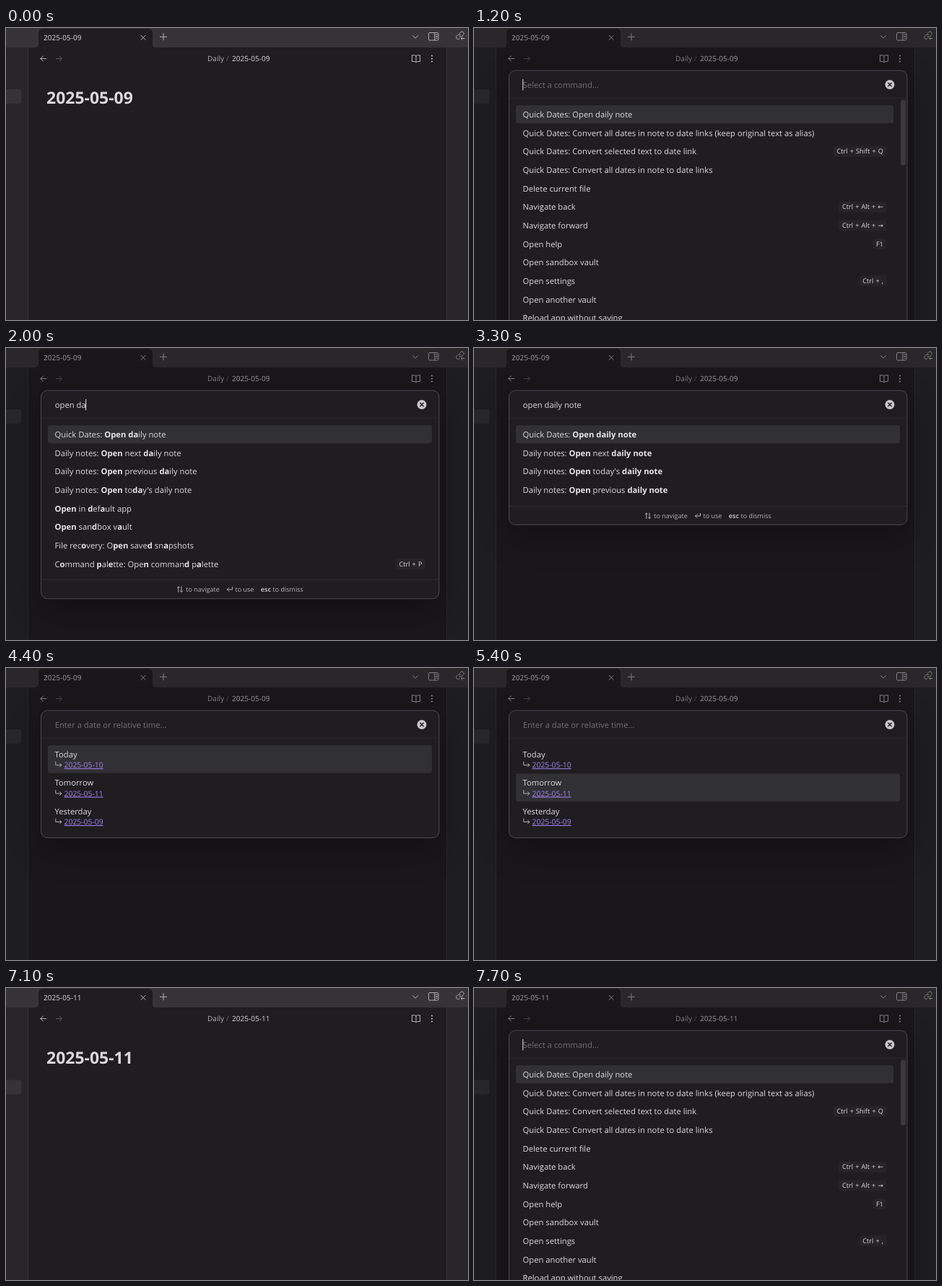
These frames come from a looping animation (640x405 px, 8 s). An HTML page:

```html
<!DOCTYPE html>
<html lang="en">
<head>
<meta charset="utf-8">
<title>Daily note palette</title>
<style>
html, body { margin: 0; width: 100%; height: 100%; overflow: hidden; background: #1f1d20; }
svg { display: block; width: 640px; height: 405px; }
text { font-family: "Open Sans", "Noto Sans", "DejaVu Sans", sans-serif; font-size: 11.25px; fill: #dadada; white-space: pre; text-rendering: geometricPrecision; }
.b { font-weight: 700; fill: #e6e6e6; }
.tab { font-size: 10.05px; }
.title { font-size: 23px; font-weight: 700; }
.hint { font-size: 9px; fill: #b0afb1; }
.key { font-size: 9.2px; word-spacing: .7px; text-anchor: end; }
.link { font-size: 10.4px; fill: #a283ee; text-decoration: underline; }
.ph { fill: #727074; }
.ico { fill: none; stroke: #b2b1b3; stroke-width: 1; stroke-linecap: round; stroke-linejoin: round; }
</style>
</head>
<body>
<svg viewBox="0 0 640 405" xmlns="http://www.w3.org/2000/svg">
  <defs>
    <filter id="blur" x="-30%" y="-60%" width="160%" height="220%"><feGaussianBlur stdDeviation="24"/></filter>
  </defs>
  <rect width="640" height="405" fill="#1f1d20"/>
  <path d="M0 27H30V405H0zM611 27H640V405H611z" fill="#272528"/>
  <path d="M30.5 27V405M610.5 27V405" stroke="#343236"/>
  <rect width="640" height="27" fill="#363437"/>
  <path d="M40 27q5 0 5-5V7q0-6 6-6H197q6 0 6 6V22q0 5 5 5z" fill="#1f1d20"/>
  <rect id="side" x="-4" width="25.5" height="20" rx="3" fill="#353337"/>
  <g class="ico">
    <path d="M187 10.3l6.2 6.2M193.2 10.3l-6.2 6.2M213.4 12.3h9.2M218 7.7v9.2M563.3 10.5l3.7 3.7 3.7-3.7"/>
    <rect x="585.5" y="6.5" width="13.5" height="10.5" rx="1.5"/>
    <path d="M593.8 6.5v10.5M595.5 9h2M595.5 11.5h2M595.5 14h2"/>
    <path d="M628.3 7.3l1.5-1.5a2.6 2.6 0 0 1 3.7 3.7l-2 2a2.6 2.6 0 0 1-3.7 0M629.8 9.5a2.6 2.6 0 0 0-3.7 0l-1.6 1.6a2.6 2.6 0 0 0 3.7 3.7M635 14.5h-4.500M632.300 12.700l-1.800 1.800 1.800 1.800"/>
    <path d="M55.800 42.500H47.800M51.500 38.800l-3.700 3.700 3.700 3.700"/>
    <path d="M69.500 42.500h8M73.800 38.800l3.700 3.700-3.700 3.700" stroke="#5c5a5e"/>
    <path d="M568 39.500q0-1.700-1.700-1.700H562.500v8.700h3.800q1.700 0 1.700 1.400q0-1.400 1.700-1.400h3.800v-8.700h-3.800q-1.700 0-1.700 1.700v8"/>
  </g>
  <g fill="#b2b1b3"><circle cx="590" cy="38.500" r="1.100"/><circle cx="590" cy="42.500" r="1.100"/><circle cx="590" cy="46.500" r="1.100"/></g>
  <text class="tab" id="tab" x="52" y="17"></text>
  <text class="tab" x="279" y="46" style="fill:#b3b2b4">Daily</text>
  <text class="tab" x="305" y="46" style="fill:#676569">/</text>
  <text class="tab" id="crumb" x="313" y="46"></text>
  <text class="title" id="title" x="56" y="105.300"></text>
  <rect id="noteCaret" x="56" y="121" width="1" height="18" fill="#dadada"/>
  <g id="modal">
    <rect width="640" height="405" fill="#0a0a0a" opacity=".3"/>
    <rect id="shadow" x="48" y="74" width="552" fill="#000" opacity=".3" filter="url(#blur)"/>
    <rect id="frame" x="48.500" y="59" width="551.500" rx="9" fill="#1f1d20" stroke="#4b494d"/>
    <path d="M49 97.500H600" stroke="#29272a"/>
    <circle cx="576" cy="78.500" r="6.500" fill="#c9c8ca"/>
    <path d="M573.700 76.200l4.600 4.600M578.300 76.200l-4.600 4.600" stroke="#1f1d20" stroke-width="1.400" stroke-linecap="round"/>
    <text id="input" x="67.700" y="83"></text>
    <g id="list"></g>
    <g id="foot">
      <path d="M49 .5H600" stroke="#2d2b2f"/>
      <path class="ico" d="M238.800 17.500v-7.500M237.300 11.500l1.500-1.500 1.500 1.500M243 10v7.500M241.500 16l1.500 1.500 1.500-1.500M313.500 10.500v3.500h-7M308.800 11.700l-2.300 2.300 2.300 2.300"/>
      <text class="hint" x="249.300" y="17">to navigate</text>
      <text class="hint" x="317.500" y="17">to use</text>
      <text class="hint b" x="352.800" y="17">esc</text>
      <text class="hint" x="369.500" y="17">to dismiss</text>
    </g>
    <rect id="caret" y="71" width="1" height="15.500" fill="#e4e4e4"/>
  </g>
</svg>
<script>
const NS = 'http://www.w3.org/2000/svg';
const $ = id => document.getElementById(id);
const LOOP = 8000, TOP = 107.2, ROW = 25.65, DATE_ROW = 39.4;

// Asterisks switch bold on and off; a hotkey follows the bar.
const COMMANDS = [
  'Quick Dates: Open daily note',
  'Quick Dates: Convert all dates in note to date links (keep original text as alias)',
  'Quick Dates: Convert selected text to date link|Ctrl + Shift + Q',
  'Quick Dates: Convert all dates in note to date links',
  'Delete current file', 'Navigate back|Ctrl + Alt + ←', 'Navigate forward|Ctrl + Alt + →',
  'Open help|F1', 'Open sandbox vault', 'Open settings|Ctrl + ,', 'Open another vault',
  'Reload app without saving'
];
const OPEN = [
  'Open help|F1', 'Open settings|Ctrl + ,', 'Open sandbox vault', 'Open another vault',
  'Open in default app', 'Open current tab in new window',
  'Outline: Open outline of the current file', 'Graph view: Open graph view|Ctrl + G',
  'Graph view: Open local graph', 'Backlinks: Open backlinks for the current note',
  'Quick Dates: Open daily note', 'Daily notes: Open next daily note'
];
const OPEN_D = [
  'Quick Dates: *Open d*aily note', 'Daily notes: *Open* next *d*aily note',
  'Daily notes: *Open* previous *d*aily note', "Daily notes: *Open* to*d*ay's daily note",
  '*Open* in *d*efault app', '*Open* san*d*box vault', '*Open* current tab in new win*d*ow',
  '*Open* link un*d*er cursor in new tab', 'File rec*o*very: O*pen* save*d* snapshots',
  'C*o*mmand *p*al*e*tte: Ope*n* comman*d* palette|Ctrl + P'
];
const OPEN_DA = [
  'Quick Dates: *Open da*ily note', 'Daily notes: *Open* next *da*ily note',
  'Daily notes: *Open* previous *da*ily note', "Daily notes: *Open* to*da*y's daily note",
  '*Open* in *d*ef*a*ult app', '*Open* san*d*box v*a*ult',
  'File rec*o*very: O*pen* save*d* sn*a*pshots',
  'C*o*mmand *p*al*e*tte: Ope*n* comman*d* p*a*lette|Ctrl + P'
];
const DATES = [['Today', '2025-05-10'], ['Tomorrow', '2025-05-11'], ['Yesterday', '2025-05-09']];

const typedOpen = q => OPEN.map(s => s.replace('Open', `*O${q.slice(1)}*${'Open'.slice(q.length)}`));
const typedDaily = q => {
  const rest = 'daily note'.slice(q.length);
  return [`Quick Dates: *Open ${q}*${rest}`,
    ...['next', "today's", 'previous'].map(w => `Daily notes: *Open* ${w} *${q}*${rest}`)];
};

const note = at => ({ at });
const palette = (at, query, rows, thumb) => ({ at, query, rows, thumb, hint: 'Select a command...' });
const dates = (at, sel) => ({ at, sel, query: '', hint: 'Enter a date or relative time...' });
const daily = (at, q) => palette(at, 'open ' + q, typedDaily(q));
const open = (at, q) => palette(at, q, typedOpen(q), 330);

const STATES = [
  note(0),
  palette(100, '', COMMANDS, 91),
  open(1300, 'o'), open(1400, 'op'), open(1500, 'ope'), open(1600, 'open'),
  palette(1800, 'open d', OPEN_D),
  palette(2000, 'open da', OPEN_DA),
  daily(2100, 'dail'), daily(2200, 'daily'), daily(2400, 'daily n'),
  daily(2500, 'daily no'), daily(2600, 'daily not'), daily(2800, 'daily note'),
  dates(3700, 0), dates(5400, 1),
  note(6400),
  palette(7700, '', COMMANDS, 91)
];
const CARET_OFF = [[600, 1200], [3300, 3700], [4200, 4700], [5300, 5800], [6300, 6400]];

function add(tag, attrs, text) {
  const el = document.createElementNS(NS, tag);
  for (const k in attrs) el.setAttribute(k, attrs[k]);
  if (text) el.textContent = text;
  $('list').append(el);
  return el;
}
const highlight = (y, w, h) => add('rect', { x: 58, y, width: w, height: h, rx: 3, fill: '#313034' });

function commandRow(row, i, scrolls) {
  const [label, key] = row.split('|');
  const y = TOP + i * ROW;
  if (!i) highlight(y, scrolls ? 523 : 532, ROW - .5);
  const line = add('text', { x: 67.5, y: y + 16.8 });
  label.split('*').forEach((part, n) => {
    const span = document.createElementNS(NS, 'tspan');
    if (n % 2) span.setAttribute('class', 'b');
    span.textContent = part;
    line.append(span);
  });
  if (!key) return;
  const right = scrolls ? 567 : 576.5;
  const box = add('rect', { y: y + 5.3, height: 15, rx: 3, fill: '#262427' });
  const w = add('text', { class: 'key', x: right, y: y + 15.9 }, key).getComputedTextLength();
  box.setAttribute('x', right - w - 4.7);
  box.setAttribute('width', w + 9.4);
}

function dateRow([name, date], i, sel) {
  const y = TOP + i * DATE_ROW;
  if (i === sel) highlight(y, 532, 38.6);
  add('text', { x: 67.5, y: y + 16.8 }, name);
  add('path', { class: 'ico', d: `M68.800 ${y + 23}v4.500h8M74.500 ${y + 25.2}l2.300 2.300-2.300 2.300` });
  add('text', { class: 'link', x: 80.5, y: y + 31 }, date);
}

function build(s) {
  const late = s.at >= 6400;
  for (const id of ['tab', 'crumb', 'title']) $(id).textContent = late ? '2025-05-11' : '2025-05-09';
  $('side').setAttribute('y', late ? 127.5 : 85);
  const shown = s.query !== undefined;
  $('modal').style.display = shown ? '' : 'none';
  if (!shown) return;

  $('list').textContent = '';
  $('input').textContent = s.query || s.hint;
  $('input').setAttribute('class', s.query ? '' : 'ph');
  $('caret').setAttribute('x', s.query ? 67.2 + $('input').getComputedTextLength() : 67.3);
  let bottom = 235.5;
  if (s.rows) {
    const line = TOP + s.rows.length * ROW + 9;
    bottom = s.thumb ? 470 : line + 26.3;
    s.rows.forEach((r, i) => commandRow(r, i, s.thumb));
    $('foot').setAttribute('transform', `translate(0 ${Math.round(line)})`);
    if (s.thumb) add('rect', { x: 591, y: 99.5, width: 7, height: s.thumb, rx: 3, fill: '#3a383c' });
  } else {
    DATES.forEach((d, i) => dateRow(d, i, s.sel));
  }
  $('foot').style.display = s.rows && !s.thumb ? '' : 'none';
  $('frame').setAttribute('height', bottom - 59);
  $('shadow').setAttribute('height', bottom - 59);
}

let current;
function draw(t) {
  const s = STATES.findLast(x => x.at <= t);
  if (s !== current) build(current = s);
  const off = CARET_OFF.some(([a, b]) => t >= a && t < b);
  $('caret').style.display = off ? 'none' : '';
  const noteOn = (t >= 6400 && t < 6800) || (t >= 7400 && t < 7700);
  $('noteCaret').style.display = noteOn ? '' : 'none';
}

const start = performance.now();
function tick() {
  draw((performance.now() - start) % LOOP);
  requestAnimationFrame(tick);
}
tick();
</script>
</body>
</html>
```
